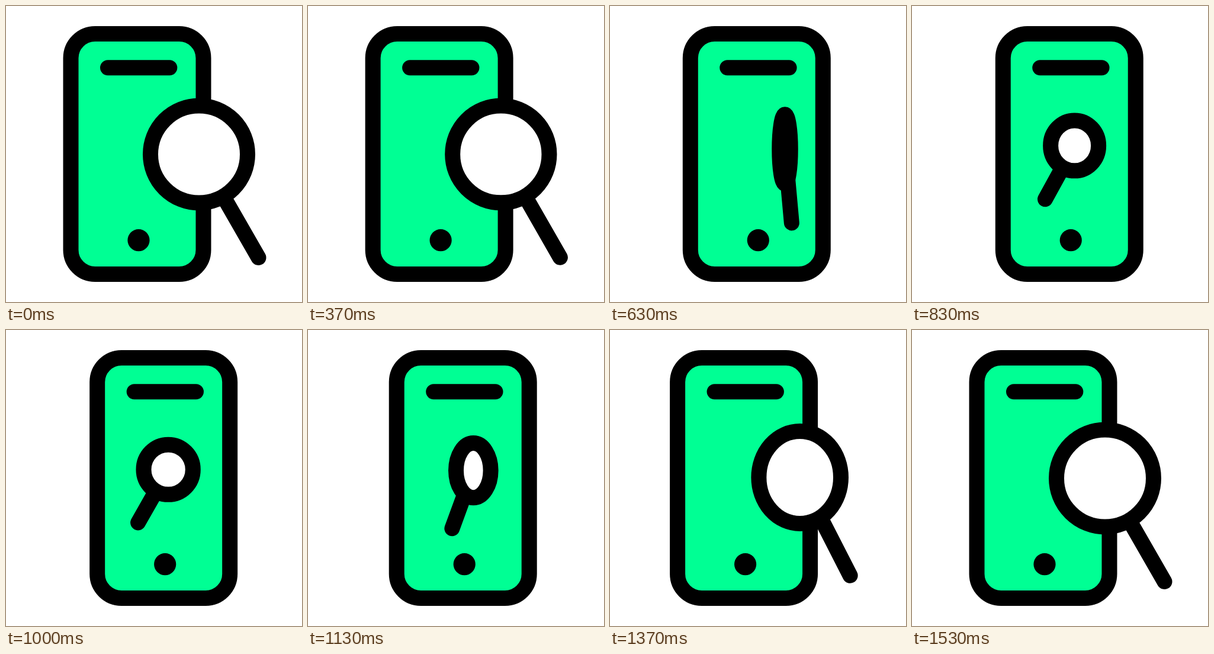
An HTML page that plays this animation: 500 px wide and 500 px high, repeating every 1.7 s.

```html
<!DOCTYPE html>
<html lang="en">
<head>
<meta charset="utf-8">
<title>Phone search</title>
<style>
  html, body { margin: 0; width: 100%; height: 100%; overflow: hidden; background: #fff; }
  svg { display: block; width: 100%; height: 100%; }
  .line { stroke: #000; stroke-width: 26; stroke-linecap: round; }
</style>
</head>
<body>
<svg viewBox="0 0 500 500">
  <g id="phone">
    <rect class="line" x="109.5" y="47" width="224" height="406" rx="41" fill="#00ff94"/>
    <path class="line" d="M172 104.2H276.3"/>
    <circle cx="224" cy="395.7" r="18.6"/>
  </g>
  <g id="glass">
    <line id="handle" class="line"/>
    <ellipse id="lens" class="line" fill="#fff"/>
  </g>
</svg>
<script>
  const LOOP = 1700;
  const FPS = 30;
  const MOVE = 17;        // ticks per move
  const OUT = 10;         // tick at which the phone slides right
  const BACK = 29;        // tick at which everything returns
  const RADIUS = 82;
  const SMALL = 42;       // lens radius once shrunk and mirrored
  const [phone, glass, lens, handle] =
    ['phone', 'glass', 'lens', 'handle'].map(id => document.getElementById(id));

  const clamp = v => Math.min(1, Math.max(0, v));
  const mix = (a, b, k) => a + (b - a) * k;

  // cubic-bezier(2/3, 0, 1/3, 1), solved by bisection
  function ease(p) {
    if (p <= 0 || p >= 1) return clamp(p);
    let lo = 0, hi = 1, u = 0.5;
    for (let i = 0; i < 30; i++) {
      u = (lo + hi) / 2;
      const v = 1 - u;
      const x = 2 * u * v * v + u * u * v + u * u * u;
      if (x < p) lo = u; else hi = u;
    }
    return u * u * (3 - 2 * u);
  }

  function set(el, attrs) {
    for (const key in attrs) el.setAttribute(key, attrs[key]);
  }

  function draw(ms) {
    const tick = Math.floor((ms % LOOP + 4) * FPS / 1000);
    const k = ease((tick - OUT) / MOVE) - ease((tick - BACK) / MOVE);
    const sx = mix(1, -SMALL / RADIUS, k);
    const sy = mix(1, SMALL / RADIUS, k);

    set(phone, { transform: `translate(${44.8 * k} 0)` });
    set(glass, { transform: `translate(${mix(326, 274, k)} ${mix(250.5, 235.7, k)})` });
    set(lens, { rx: RADIUS * Math.abs(sx), ry: RADIUS * sy });
    set(handle, { x1: 41 * sx, y1: 71 * sy, x2: 100.5 * sx, y2: 174.5 * sy });
  }

  const start = performance.now();
  function loop() {
    draw(performance.now() - start);
    requestAnimationFrame(loop);
  }
  loop();
</script>
</body>
</html>
```
